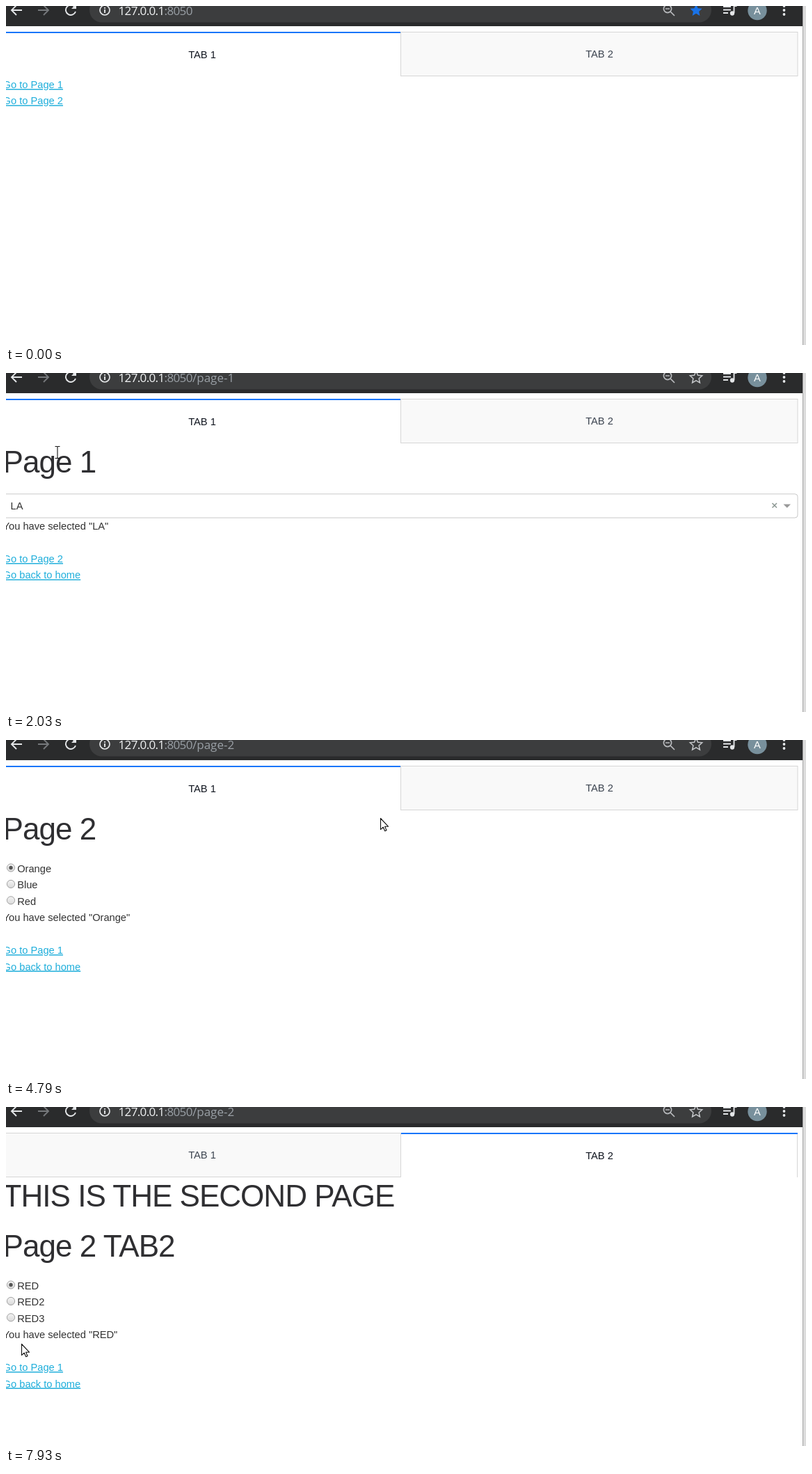
An HTML page that plays this animation: 1150 by 487 pixels, repeating every 8000 ms.

```html
<!DOCTYPE html>
<html lang="en">
<head>
<meta charset="utf-8">
<title>Tabs and pages</title>
<style>
  html, body { margin: 0; height: 100%; overflow: hidden; background: #fff; }
  svg { display: block; }
  text { font: 14.66px "Liberation Sans", Arial, sans-serif; fill: #323232; white-space: pre; }
  .h1 { font-size: 44px; letter-spacing: -.977px; fill: #2f2f32; }
  .link { fill: #1eaedb; text-decoration: underline; }
  .hover { fill: #0fa0ce; }
  .url { font: 17px "Open Sans", "Noto Sans", sans-serif; fill: #9aa0a6; }
  .host { letter-spacing: -.65px; }
  .host tspan { fill: #f1f3f4; }
  .mid { text-anchor: middle; }
  .tab { fill: #3c4450; }
  .tab.on { fill: #10151f; }
  .icon { fill: none; stroke: #e4e6e8; stroke-width: 1.9; }
  .edge { fill: none; stroke: #d6d6d6; }
  .ring { fill: none; stroke: #5b97e5; stroke-width: 1.2; }
  .click { fill: #ff0; fill-opacity: .47; }
  .cursor { fill: #fff; stroke: #111; stroke-width: 1.1; stroke-linejoin: round; }
</style>
</head>
<body>
<svg width="1150" height="487" viewBox="0 0 1150 487">
  <defs>
    <linearGradient id="knob" x2="0" y2="1">
      <stop stop-color="#f4f4f4"/><stop offset="1" stop-color="#d9d9d9"/>
    </linearGradient>
    <circle id="radio" cx="7" r="5.6" fill="url(#knob)" stroke="#a3a3a3"/>
    <path id="star" d="M0-8.6 2.6-2.8 8.7-2.2 4.1 1.9 5.4 8 0 4.8-5.4 8-4.1 1.9-8.7-2.2-2.6-2.8Z"/>
  </defs>

  <!-- browser bar -->
  <rect width="1145" height="29" fill="#2a2b2c"/>
  <rect x="120" y="-12" width="894" height="35.5" rx="17.7" fill="#3c3d3e"/>
  <g class="icon">
    <path d="M23 6H8M15-1 8 6l7 7"/>
    <path d="M46 6h15M54-1l7 7-7 7" stroke="#75787b"/>
    <path d="M98.5 1A7.2 7.2 0 1 0 100 8"/>
    <path d="M101-3V4H94Z" fill="#e4e6e8" stroke="none"/>
    <circle cx="142" cy="6" r="7" stroke-width="1.7"/>
    <path d="M142 5v5M142 2v1.8"/>
    <g stroke="#b9bbbe" stroke-width="1.7">
      <circle cx="951" cy="4" r="5.6"/><path d="M955 8l6 6M948 4h6"/>
    </g>
    <path d="M1031 1h11M1031 5.5h11M1031 10h7M1046.5 10V0h4"/>
    <circle cx="1044" cy="10.5" r="2.2" fill="#e4e6e8"/>
  </g>
  <circle cx="1080" cy="6.5" r="13.7" fill="#78909c"/>
  <text class="mid" x="1080" y="12" style="fill:#fff">A</text>
  <g fill="#e4e6e8">
    <circle cx="1118.5" cy="0" r="1.9"/><circle cx="1118.5" cy="6" r="1.9"/><circle cx="1118.5" cy="12" r="1.9"/>
  </g>
  <use href="#star" x="992" y="6" fill="#1a73e8" data-on="0 1630"/>
  <use href="#star" x="992" y="6" fill="none" stroke="#c4c6c9" stroke-width="1.5" data-on="1630 8000"/>
  <text class="url host" x="161.5" y="12.5"><tspan>127.0.0.1</tspan>:8050</text>
  <text class="url" x="268" y="12.5" data-on="1630 3870">/page-1</text>
  <text class="url" x="268" y="12.5" data-on="3870 8000">/page-2</text>

  <!-- window edge -->
  <rect x="1146" width="4" height="487" fill="#dcdcdc"/>
  <rect x="1145" width="1" height="487" fill="#a6a6a6"/>

  <!-- tabs -->
  <g data-on="0 6060">
    <rect class="edge" x="567.5" y="37.5" width="570.5" height="63" style="fill:#f9f9f9"/>
    <rect y="37" width="567" height="2" fill="#1975fa"/>
    <text class="tab on mid" x="282" y="75">TAB 1</text>
    <text class="tab mid" x="853" y="74">TAB 2</text>
  </g>
  <g data-on="6060 8000">
    <rect class="edge" x="-5.5" y="37.5" width="573" height="63" style="fill:#f9f9f9"/>
    <path class="edge" d="M1137.5 38V101"/>
    <rect x="568" y="37" width="570" height="2" fill="#1975fa"/>
    <text class="tab mid" x="282" y="74">TAB 1</text>
    <text class="tab on mid" x="853" y="75">TAB 2</text>
  </g>

  <g id="pages"></g>
  <g id="clicks"></g>
  <g id="pointer" class="cursor">
    <path id="arrow" d="M.5.5V16.6L4.2 13.2 6.7 18.8 9 17.8 6.6 12.3H11.6Z"/>
    <g id="hand">
      <path d="M-1.9 13.6V2.2Q-1.9.5 0 .5T1.9 2.2V8Q3.6 6.6 5 8.2 6.7 7.2 7.7 9 10 8.3 10 11V16Q10 18.5 8 22.5H-.5Q-1.5 19.5-4 16.5-6.2 13.5-5.6 11.8-4 10.2-1.9 13.6Z"/>
      <path d="M1.9 8v4M5 8.4V12M7.7 9.2v3.3" fill="none"/>
    </g>
    <path id="beam" d="M-3.5-8.5H-1Q0-8.5 0-7.5 0-8.5 1-8.5H3.5M0-7.5V7.5M-3.5 8.5H-1Q0 8.5 0 7.5 0 8.5 1 8.5H3.5" fill="none"/>
  </g>
</svg>
<script>
const LOOP = 8000, STEP = 78, LEFT = -4.4, ROW = 23.42;
const $ = id => document.getElementById(id);

const text = (x, y, str, cls = '') => `<text class="${cls}" x="${x}" y="${y}">${str}</text>`;
const show = (from, to, body) => `<g data-on="${from} ${to}">${body}</g>`;
const title = (y, str) => text(LEFT, y, str, 'h1');
const link = (y, str, from = 0, to = 0) =>
  text(LEFT, y, str, 'link') + (to ? show(from, to, text(LEFT, y, str, 'link hover')) : '');
const chosen = (from, to, y, str) => show(from, to, text(LEFT, y, `You have selected "${str}"`));
const ring = (from, to, y) =>
  show(from, to, `<rect class="ring" x="-6" y="${y}" width="88.5" height="17.5" rx="1"/>`);
const radios = (y, names) => names.map((name, i) =>
  `<use href="#radio" y="${y - 6.5 + i * ROW}"/>` + text(16.2, y + i * ROW, name)).join('') +
  `<circle cx="7" cy="${y - 6.5}" r="2.7" fill="#555"/>`;
const choicePage = (y, names) => radios(y, names) +
  link(y + 5 * ROW, 'Go to Page 1') + link(y + 6 * ROW, 'Go back to home');

$('pages').innerHTML =
  show(0, 1710,
    link(118, 'Go to Page 1', 920, 1710) + link(141.3, 'Go to Page 2') + ring(1550, 1710, 104)) +
  show(1710, 3940,
    title(143, 'Page 1') +
    '<rect x="-6" y="173.8" width="1144" height="34.2" rx="4" fill="#fff" stroke="#c9c9c9"/>' +
    text(6.5, 196, 'LA') +
    show(2030, 3940, '<path d="M1101.5 187l6.5 6.5m0-6.5l-6.5 6.5" stroke="#8b9692" stroke-width="1.5"/>') +
    '<path d="M1117.5 188.5h10.5l-5.2 5.2Z" fill="#999"/>' +
    chosen(1870, 3940, 225, 'LA') +
    link(272, 'Go to Page 2', 3010, 3940) + link(295.3, 'Go back to home') + ring(3790, 3940, 258)) +
  show(3940, 6150,
    title(143, 'Page 2') + choicePage(190, ['Orange', 'Blue', 'Red']) +
    chosen(4020, 6150, 190 + 3 * ROW, 'Orange')) +
  show(6150, LOOP,
    title(143, 'THIS IS THE SECOND PAGE') + title(215.2, 'Page 2 TAB2') +
    choicePage(262, ['RED', 'RED2', 'RED3']) +
    chosen(6230, LOOP, 262 + 3 * ROW, 'RED'));

$('clicks').innerHTML = [[1470, 1550, 75, 111], [3550, 3790, 39, 262], [5900, 5980, 802, 93]]
  .map(([from, to, x, y]) => show(from, to, `<circle class="click" cx="${x}" cy="${y}" r="15"/>`)).join('');

// start time, shape, steps, from x y, to x y
const moves = [
  [0, ''],
  [150, 'arrow', 10, 906, 450, 110, 130],
  [920, 'hand', 1, 73, 114, 73, 114],
  [1150, 'hand', 6, 73, 114, 75, 110],
  [2030, 'beam', 11, 74, 114, 59, 215],
  [2850, 'arrow', 2, 56, 226, 50, 242],
  [3010, 'hand', 1, 43, 254, 43, 254],
  [3090, 'hand', 3, 40, 260, 39, 262],
  [4320, 'arrow', 7, 110, 240, 538, 112],
  [4870, 'arrow', 4, 610, 110, 797, 103],
  [5190, 'hand', 3, 801, 101, 801, 98],
  [5590, 'hand', 3, 802, 97, 802, 93],
  [6450, 'arrow', 2, 520, 110, 112, 138],
  [6610, ''],
  [6990, 'arrow', 4, 1, 273, 20, 282],
  [7610, 'arrow', 5, 20, 292, 22, 340]
];
const timed = [...document.querySelectorAll('[data-on]')].map(el => [el, ...el.dataset.on.split(' ').map(Number)]);

function render(t) {
  for (const [el, from, to] of timed) el.style.display = t >= from && t < to ? '' : 'none';
  const [start, shape, steps = 1, x0 = 0, y0 = 0, x1 = 0, y1 = 0] = moves.findLast(m => m[0] <= t);
  const last = steps - 1;
  const p = last ? Math.min(last, Math.floor((t - start) / STEP)) / last : 1;
  const at = (a, b) => Math.round(a + (b - a) * p);
  for (const id of ['arrow', 'hand', 'beam']) $(id).style.display = id === shape ? '' : 'none';
  $('pointer').setAttribute('transform', `translate(${at(x0, x1)} ${at(y0, y1)})`);
}

const origin = performance.now();
function tick() {
  render((performance.now() - origin) % LOOP);
  requestAnimationFrame(tick);
}
tick();
</script>
</body>
</html>
```
